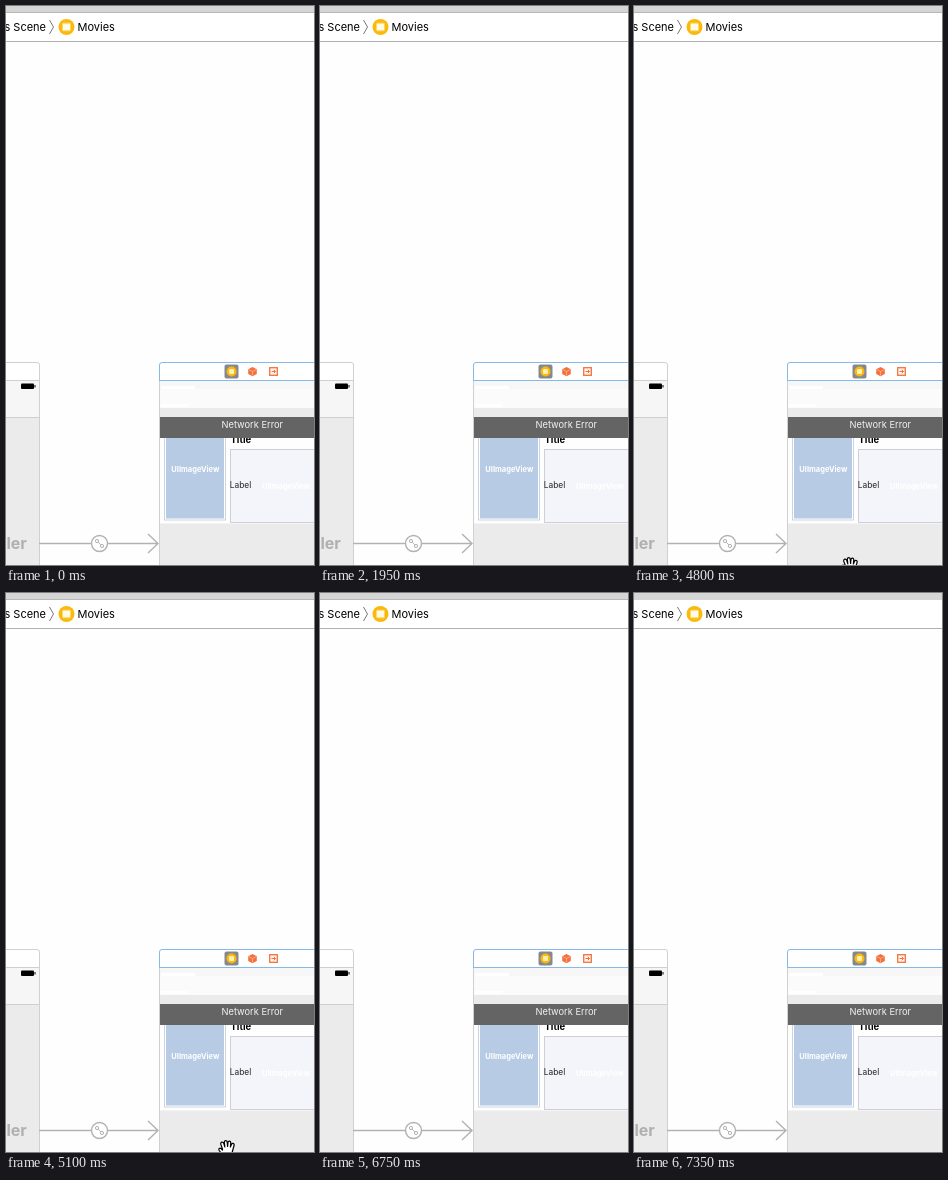
These frames come from a looping animation (308x559 px, 8 s). An HTML page:

```html
<!DOCTYPE html>
<html lang="en">
<head>
<meta charset="utf-8">
<style>
html, body { margin: 0; width: 100%; height: 100%; overflow: hidden; background: #fefefe }
svg { display: block; font-family: Inter, "Liberation Sans", sans-serif }
.line { fill: none; stroke: #b2b2b2; stroke-width: 1.4 }
.bold { font-weight: 700 }
</style>
</head>
<body>
<svg width="308" height="559" viewBox="0 0 308 559">
  <!-- Path bar -->
  <path fill="#d5d5d5" d="M0 0h308v7H0z"/>
  <path id="edge" fill="#b8b8b8" d="M0 6h308v1H0z"/>
  <path fill="#fff" d="M0 7h308v28H0z"/>
  <path fill="#b0b0b0" d="M0 35h308v1H0z"/>
  <g font-size="11">
    <text x="40" y="25" text-anchor="end">s Scene</text>
    <text x="71.5" y="25">Movies</text>
  </g>
  <path d="M43.5 14l4 7-4 7" fill="none" stroke="#777"/>
  <circle cx="60.5" cy="21" r="8" fill="#fbb90b"/>
  <rect x="56.5" y="17.2" width="8" height="7.6" rx="1" fill="#fffbe8" stroke="#fdd866"/>

  <!-- Left scene -->
  <path fill="#fff" d="M0 357h33v17H0z"/>
  <path fill="#f6f6f6" d="M0 374h33v37H0z"/>
  <path fill="#ebebeb" d="M0 411h33v148H0z"/>
  <path d="M0 374.5h33M0 411.5h33" stroke="#cfcfcf"/>
  <path d="M0 356.5h31q2.500 0 2.500 2.500v200" fill="none" stroke="#d0d0d0"/>
  <rect x="15" y="377.500" width="13" height="5.500" rx="1"/>
  <path d="M28.500 379h1v2.500h-1z"/>
  <text id="word" class="bold" x=".4" y="543" font-size="16" fill="#b0b0b0">ler</text>

  <!-- Right scene -->
  <path fill="#fff" d="M154 357h154v17H154z"/>
  <path fill="#f7f7f7" d="M154 375h154v9H154z"/>
  <path fill="#fbfbfb" d="M154 383h154v19H154z"/>
  <path fill="#ebebeb" d="M154 402h154v157H154z"/>
  <path fill="#fff" d="M155 380h34v3h-34zM155 398h27v3h-27z"/>
  <path fill="#fefefe" d="M154 432h154v85.500H154z"/>
  <path d="M153.500 559V359q0-2.500 2.500-2.500h152" fill="none" stroke="#85b9e8"/>
  <path d="M154 374.500h154" stroke="#85b9e8"/>
  <path d="M153.500 375v184" stroke="#d0d0d0"/>

  <rect x="218.500" y="358.500" width="14" height="14" rx="2" fill="#85898f"/>
  <circle cx="225.500" cy="365.500" r="5" fill="#fbb90b"/>
  <rect x="223" y="363" width="5" height="5" rx="1" fill="#ffefb0"/>
  <path fill="#f4713d" d="M246.500 361l4.300 2.200v4.800l-4.300 2.300-4.300-2.300v-4.800z"/>
  <path d="M242.700 363.500l3.800 2 3.800-2M246.500 365.500v4" fill="none" stroke="#ffc2a7" stroke-width=".7"/>
  <rect x="263.700" y="361.700" width="7.600" height="7.600" fill="#fff4ee" stroke="#f4713d" stroke-width="1.300"/>
  <path d="M265.500 365.500h4m-1.700-1.700l1.700 1.700-1.700 1.700" fill="none" stroke="#f4713d"/>

  <rect x="158.500" y="425.500" width="61" height="88.500" fill="#fff" stroke="#cbd5e1"/>
  <rect x="160" y="427" width="58" height="85.500" fill="#b7cbe4"/>
  <rect x="224.500" y="443.500" width="90" height="73" fill="#f4f5fa" stroke="#d0d0d4"/>
  <g class="bold" font-size="7.500" text-anchor="middle" fill="#fff">
    <text x="189.300" y="466">UIImageView</text>
    <text x="280" y="483">UIImageView</text>
  </g>
  <text x="223.800" y="482" font-size="8.400" fill="#222">Label</text>
  <text class="bold" x="224.500" y="437" font-size="9.500">Title</text>
  <path fill="#646464" d="M154 411h154v21H154z"/>
  <text x="246.300" y="422" font-size="9.300" text-anchor="middle" fill="#f2f2f2">Network Error</text>

  <!-- Segue -->
  <path class="line" d="M33 537.500h119M142 528l10 9.500-10 9.500"/>
  <circle class="line" cx="93.500" cy="537.500" r="8" style="fill:#fefefe"/>
  <g class="line" style="stroke-width:1">
    <circle cx="91" cy="535" r="1.600"/>
    <circle cx="96" cy="540" r="1.600"/>
    <path d="M92.200 536.200l2.600 2.600"/>
  </g>

  <!-- Pointers, drawn from their top left corner -->
  <path id="arrow" transform="translate(228 545)" stroke="#fff" d="M.5.500v16l3.700-3.500 2.500 6 2.500-1-2.500-5.500h5z"/>
  <path id="hand" fill="#fff" stroke="#000" stroke-width="1.200" stroke-linejoin="round"
    d="M4.500 9L2.800 4.200Q2.500 2.400 4 2.200 5.300 2 5.800 3.600L6.900 7 6.300 2.200Q6.400.700 7.800.700 9 .700 9.200 2.200L9.600 6.500 10 2.300Q10.400 1 11.600 1.200 12.900 1.500 12.700 3L12.400 7 13.500 4.300Q14.300 3 15.500 3.600 16.500 4.200 16 5.800L14.500 11 13 17H6L1.200 10.500Q.300 8.800 1.600 8.200 2.700 7.800 4.500 10z"/>
</svg>
<script>
const el = id => document.getElementById(id);
const show = (id, on) => el(id).style.visibility = on ? "visible" : "hidden";
const within = (t, from, to) => t >= from && t < to;
// start time, left, top
const steps = [[4800, 207, 551], [4950, 210, 547], [5100, 212, 547], [5250, 213, 547]];

function draw(now) {
  const t = now % 8000;
  show("edge", !within(t, 1200, 1950) && t < 6900);
  show("arrow", within(t, 2100, 2250));
  show("word", !within(t, 5250, 7350));
  show("hand", within(t, 4800, 6750));
  const [, x, y] = steps.filter(s => s[0] <= t).pop() || steps[0];
  el("hand").setAttribute("transform", `translate(${x} ${y})`);
  requestAnimationFrame(draw);
}
draw(performance.now());
</script>
</body>
</html>
```
